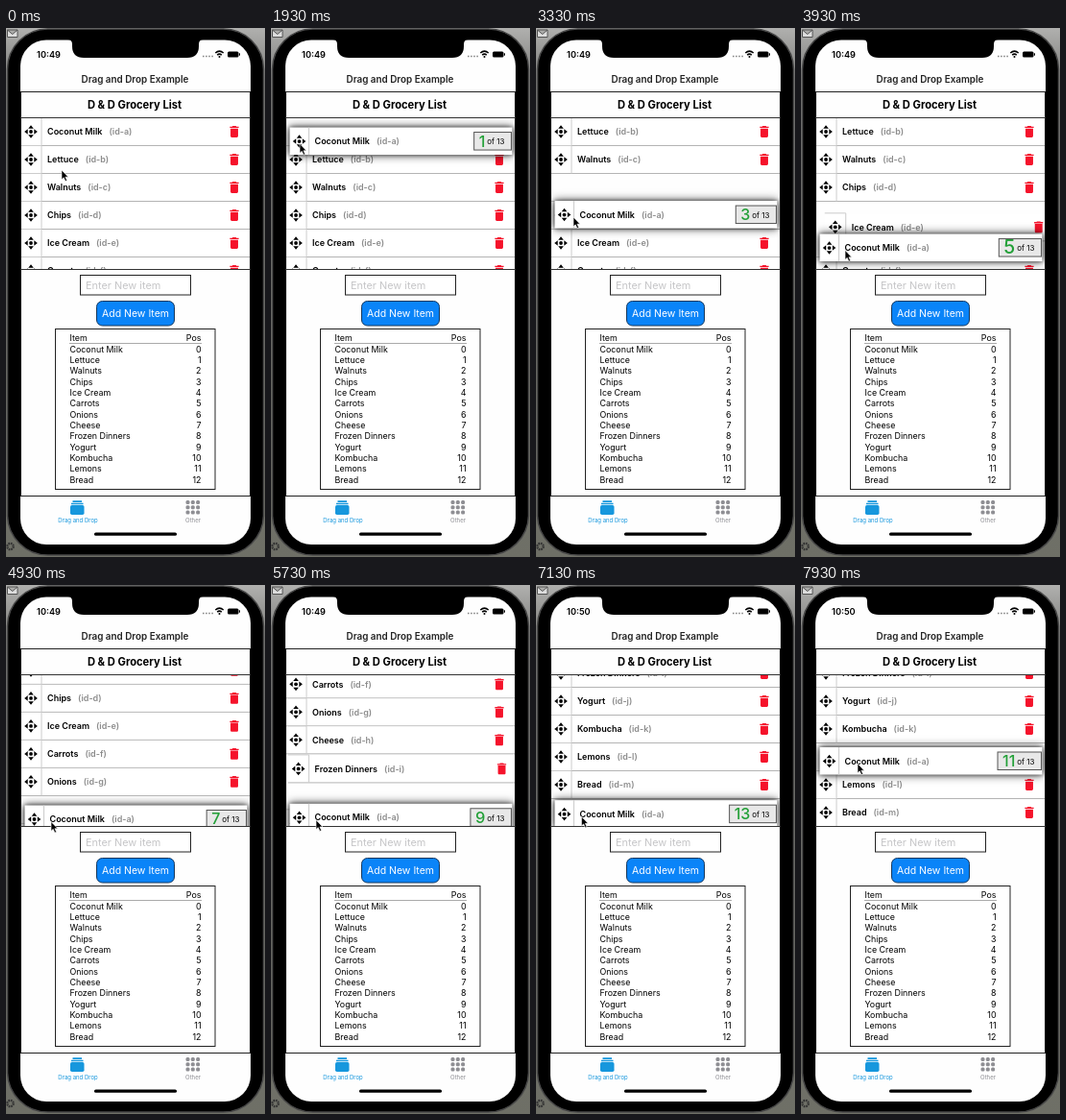
An HTML page that plays this animation: 270 by 551 pixels, repeating every 8000 ms.

```html
<!DOCTYPE html>
<html lang="en">
<head>
<meta charset="utf-8">
<title>Drag and Drop Example</title>
<style>
html, body { margin: 0; width: 100%; height: 100%; overflow: hidden; background: #777; }
svg { display: block; width: 270px; height: 551px; font: 8.9px Inter, Roboto, sans-serif; }
.semi { font-weight: 600; }
.mid { text-anchor: middle; }
.end { text-anchor: end; }
.id { fill: #8c8c8c; }
#card { filter: drop-shadow(0 0 2px rgba(0, 0, 0, .6)) drop-shadow(0 0 5px rgba(0, 0, 0, .7)); }
</style>
</head>
<body>
<svg viewBox="0 0 270 551">
  <defs>
    <linearGradient id="desk" x2="0" y2="1">
      <stop stop-color="#b0b0ae"/><stop offset=".1" stop-color="#7c7c7a"/><stop offset="1" stop-color="#6e6f66"/>
    </linearGradient>
    <clipPath id="list"><rect x="16" y="94" width="238" height="157"/></clipPath>
    <path id="arrow" d="M0-6.800L2.800-3.300h-5.600z"/>
    <g id="handle">
      <circle r="1.900"/>
      <use href="#arrow"/><use href="#arrow" transform="rotate(90)"/>
      <use href="#arrow" transform="rotate(180)"/><use href="#arrow" transform="rotate(270)"/>
    </g>
    <path id="trash" fill="#f5132b" transform="scale(.66) translate(-12 -12)"
      d="M6 19c0 1.1.9 2 2 2h8c1.1 0 2-.9 2-2V7H6v12zM19 4h-3.5l-1-1h-5l-1 1H5v2h14z"/>
  </defs>

  <rect width="270" height="551" fill="url(#desk)"/>
  <path d="M1.500 2h10.500v7.500h-10.500zl5.200 4.500 5.300-4.500" fill="#ddd" stroke="#555"/>
  <circle cx="4.500" cy="540" r="3.200" fill="none" stroke="#333" stroke-width="2.200" stroke-dasharray="1.700 .8"/>
  <rect x="1.500" y="1" width="267" height="548" rx="42" stroke="#484848" stroke-width="1.500"/>
  <rect x="15" y="12.500" width="240" height="525.500" rx="27" fill="#fefefe"/>
  <path d="M64 12h142q-5 0-5 5v2q0 12-12 12h-108q-12 0-12-12v-2q0-5-5-5z"/>

  <text id="clock" class="semi" x="32" y="30.500" font-size="9.200"></text>
  <path d="M205 29.500h11" stroke="#888" stroke-width="1.600" stroke-dasharray="1.600 1.500"/>
  <path d="M218.300 26q4.200-3.700 8.400 0M220.200 28.100q2.300-2 4.600 0" fill="none" stroke="#000" stroke-width="1.500"/>
  <circle cx="222.500" cy="30" r="1"/>
  <rect x="231" y="24.500" width="11.500" height="6" rx="1.500"/>
  <path d="M243.500 26.300v2.400" stroke="#000"/>

  <text class="semi mid" x="134.500" y="56.800" font-size="9.900" fill="#222">Drag and Drop Example</text>
  <text class="mid" x="134" y="84" font-size="11.200" font-weight="700">D &amp; D Grocery List</text>

  <g clip-path="url(#list)">
    <g id="rows"></g>
    <g id="card">
      <rect x="19.500" y="-14.500" width="232" height="28.500" fill="#fff"/>
      <path d="M39.500-14.500v28.500" stroke="#ccc"/>
      <use href="#handle" x="29.500"/>
      <text class="semi" x="45.500" y="3.200" font-size="9">Coconut Milk<tspan class="id" dx="7">(id-a)</tspan></text>
      <rect id="badge" y="-9.500" width="44" height="18.500" fill="#e8e8e8" stroke="#555"/>
      <text id="label" class="end" x="243.500" y="3.300" font-size="8"><tspan
        id="count" dy="2.200" fill="#23a038" font-weight="500"></tspan><tspan dx="2" dy="-2.200">of 13</tspan></text>
    </g>
  </g>
  <rect x="15.500" y="66.500" width="239" height="421" fill="none" stroke="#222"/>
  <path d="M15 93.500h240M15 251.500h240" stroke="#333"/>

  <rect x="77.500" y="257.500" width="115" height="20.500" fill="#fff" stroke="#222"/>
  <text x="83" y="271.900" font-size="10.900" fill="#c6c6c8">Enter New item</text>
  <rect x="94.500" y="284.500" width="81" height="25.500" rx="6" fill="#0a84f8" stroke="#15375c"/>
  <text class="mid" x="135" y="301.200" font-size="10.500" fill="#fff">Add New Item</text>

  <g id="table">
    <rect x="51.500" y="313.500" width="166.500" height="167" fill="#fff" stroke="#222"/>
    <text x="66.500" y="326">Item</text><text class="end" x="203.500" y="326">Pos</text>
    <path d="M66 328.500h138" stroke="#aaa"/>
  </g>

  <g fill="#1697dd">
    <rect x="67" y="497" width="14.500" height="10" rx="1.800"/>
    <path d="M68 495.500h12.500M69.500 493.200h9.500" stroke="#1697dd" stroke-width="1.700"/>
    <text class="mid" x="75" y="515" font-size="6">Drag and Drop</text>
  </g>
  <g fill="#8e8e93">
    <g id="grid"></g>
    <text class="mid" x="195" y="515" font-size="6">Other</text>
  </g>
  <rect x="92" y="525.500" width="86" height="3.300" rx="1.600"/>
  <path id="pointer" d="M0 0v9.800l2.200-2 1.700 3.800 1.700-.8-1.700-3.600h3z" stroke="#fff" stroke-width=".6"/>
</svg>
<script>
const LOOP = 8000, ROW = 29, TOP = 108, GRAB = 1250, SHIFT = 270;
const items = ['Coconut Milk', 'Lettuce', 'Walnuts', 'Chips', 'Ice Cream', 'Carrots', 'Onions',
  'Cheese', 'Frozen Dinners', 'Yogurt', 'Kombucha', 'Lemons', 'Bread'];

// Keys: time, then values
const pointerKeys = [[0, 58, 148], [150, 58, 148], [1000, 27, 110.5], [1300, 27, 110.5],
  [1930, 30, 120.5], [3330, 39, 197], [3780, 45, 226.5], [3930, 46, 231.5], [4400, 47, 245],
  [4930, 47, 246.5], [6330, 47, 243.5], [7100, 47, 243.5], [7650, 55, 202], [7930, 59, 186]];
const scrollKeys = [[0, 0], [4200, 0], [4640, 38], [4930, 48], [6330, 175], [6815, 219]];

const $ = id => document.getElementById(id);
const place = (el, x, y) => el.setAttribute('transform', `translate(${x} ${y})`);

function at(keys, t) {
  const n = keys.findIndex(k => k[0] > t);
  if (n < 0) return keys.at(-1).slice(1);
  const a = keys[n - 1], b = keys[n], f = (t - a[0]) / (b[0] - a[0]);
  return a.slice(1).map((v, i) => v + (b[i + 1] - v) * f);
}

const cardY = t => at(pointerKeys, t)[1] - 2.5;
const slot = t => t < GRAB ? 0 : Math.floor((cardY(t) + at(scrollKeys, t)[0] - TOP) / ROW + 1e-6);

$('rows').innerHTML = items.map((name, i) => `<g>
  <rect y="-14" width="240" height="28" fill="#fff"/>
  <path d="M0 14.500h240" stroke="#b4b4b4"/>
  <path d="M0-14.500h22v29" fill="none" stroke="#ccc"/>
  <use href="#handle" x="11"/><use href="#trash" x="223"/>
  <text class="semi" x="28" y="3.200" font-size="9">${name}<tspan class="id" dx="7">(id-${
    String.fromCharCode(97 + i)})</tspan></text></g>`).join('');

$('table').innerHTML += items.map((name, i) => {
  const y = 337.7 + i * 11.33;
  return `<text x="66.500" y="${y}">${name}</text><text class="end" x="203.500" y="${y}">${i}</text>`;
}).join('');

$('grid').innerHTML = [...Array(9).keys()].map(i =>
  `<rect x="${187.5 + i % 3 * 5.3}" y="${492 + Math.floor(i / 3) * 5.3}" width="4" height="4" rx="1.500"/>`).join('');

const rows = [...$('rows').children];

function draw(t) {
  const [x, y] = at(pointerKeys, t), [scroll] = at(scrollKeys, t), held = t >= GRAB;
  const recent = Array.from({ length: 54 }, (_, k) => slot(Math.max(0, t - k * SHIFT / 54)));
  let pulse = 0;

  rows.forEach((row, i) => {
    // Share of the recent time spent past this row gives its progress
    const p = i ? recent.filter(s => s >= i).length / recent.length : 0;
    pulse = Math.max(pulse, Math.sin(Math.PI * p));
    place(row, 15 + 11.3 * Math.sin(Math.PI * p * p), TOP + (i - p) * ROW - scroll);
  });

  rows[0].style.display = held ? 'none' : '';
  $('card').style.display = held ? '' : 'none';
  place($('card'), 0, y - 2.5);
  place($('pointer'), x, y);
  $('clock').textContent = t < 6500 ? '10:49' : '10:50';

  if (!held) return;
  $('count').textContent = recent[0] + 1;
  $('count').setAttribute('font-size', 16 + 4 * pulse);
  const width = $('label').getComputedTextLength() + 14;
  $('badge').setAttribute('x', 250.5 - width);
  $('badge').setAttribute('width', width);
}

const start = performance.now();
function frame() {
  draw((performance.now() - start) % LOOP);
  requestAnimationFrame(frame);
}
frame();
</script>
</body>
</html>
```
